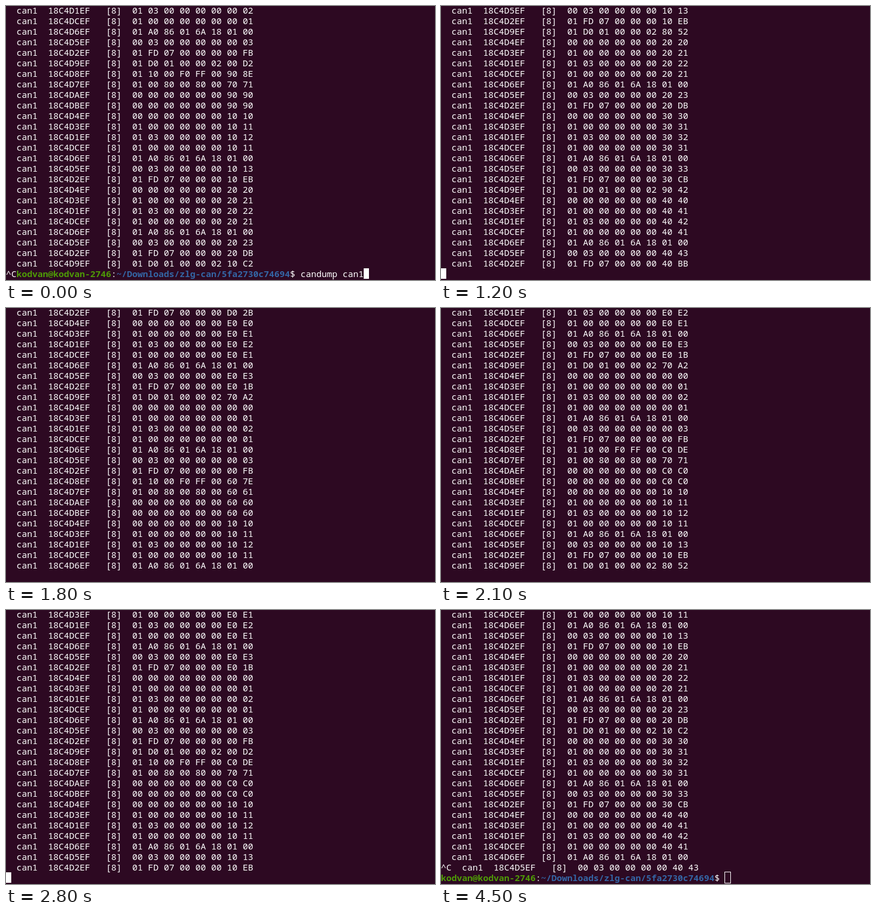
An HTML page with a canvas for the animation above (4.6 s loop, 734 px wide and 468 px high).

```html
<!DOCTYPE html>
<html lang="en">
<head>
<meta charset="utf-8">
<title>candump</title>
<style>
  html, body { margin: 0; width: 100%; height: 100%; overflow: hidden; background: #2d0922; }
  canvas { display: block; }
</style>
</head>
<body>
<canvas id="term" width="734" height="468"></canvas>
<script>
const ctx = document.getElementById('term').getContext('2d');
const LOOP = 4600, CELL_W = 9, CELL_H = 18, TOP = -2, BASE = 15, ROWS = 25;
const BG = '#2d0922', WHITE = '#ffffff', GREEN = '#4e9a06', BLUE = '#3465a4';
const FONT = '15px "Noto Sans Mono", "DejaVu Sans Mono", monospace';
const USER = 'kodvan@kodvan-2746', DIR = '~/Downloads/zlg-can/5fa2730c74694';

const hex = n => n.toString(16).toUpperCase().padStart(2, '0');
const wrap = n => ((n % 15) + 15) % 15; // all counters run from 0 to E

function format(id, bytes) {
  return `  can1  18C4${id}EF   [8]  ${bytes.map(hex).join(' ')}`;
}

// Six data bytes, a rolling counter in the high nibble, then an XOR checksum.
function packet(id, head, count) {
  const bytes = [0, 1, 2, 3, 4, 5].map(i => head[i] || 0);
  bytes.push(wrap(count) << 4);
  bytes.push(bytes.reduce((a, b) => a ^ b));
  return format(id, bytes);
}

const groupLines = g => [
  packet('D4', [], g),
  packet('D3', [1], g),
  packet('D1', [1, 3], g),
  packet('DC', [1], g),
  format('D6', [1, 0xA0, 0x86, 1, 0x6A, 0x18, 1, 0]),
  packet('D5', [0, 3], g),
  packet('D2', [1, 0xFD, 7], g)
];

const speedLine = n => packet('D9', [1, 0xD0, 1, 0, 0, 2], n);

const wheelLines = n => [
  packet('D8', [1, 0x10, 0, 0xF0, 0xFF], n),
  packet('D7', [1, 0, 0x80, 0, 0x80], Math.min(wrap(n), 7)),
  packet('DA', [], n),
  packet('DB', [], n)
];

// Every second group ends with a speed line, every fifth with wheel lines.
const stream = [], start = {};
for (let g = -20; g <= 170; g++) {
  start[g] = stream.length;
  stream.push(...groupLines(g));
  if (g & 1) stream.push(speedLine((g + 15) / 2));
  if (g % 5 === 0) stream.push(...wheelLines(g / 5 - 6));
}

// Time and number of lines printed by then.
const progress = [
  [1100, start[4] + 7 - 65],
  [1200, start[4] + 7],
  [1600, start[41] + 3],
  [2100, start[91] + 8],
  [2800, start[166] + 7]
];

function printed(t) {
  const s = Math.min(2800, Math.floor(t / 100) * 100);
  let i = 0;
  while (i < progress.length - 2 && s > progress[i + 1][0]) i++;
  const [t0, n0] = progress[i], [t1, n1] = progress[i + 1];
  return Math.round(n0 + (n1 - n0) * (s - t0) / (t1 - t0));
}

const before = [
  ...groupLines(0).slice(2), speedLine(0), ...wheelLines(9),
  ...groupLines(1), ...groupLines(2), speedLine(1)
];
const lastLine = start[169] + 5;
const after = [...stream.slice(lastLine - 24, lastLine), '^C' + stream[lastLine]];

function write(text, col, row, color = WHITE, bold = false) {
  ctx.font = (bold ? 'bold ' : '') + FONT;
  ctx.fillStyle = color;
  const y = TOP + row * CELL_H + BASE;
  [...text].forEach((ch, i) => {
    if (ch !== ' ') ctx.fillText(ch, (col + i) * CELL_W, y);
  });
  return col + text.length;
}

function prompt(prefix, command) {
  let col = write(prefix, 0, ROWS);
  col = write(USER, col, ROWS, GREEN, true);
  col = write(':', col, ROWS);
  col = write(DIR, col, ROWS, BLUE, true);
  return write('$ ' + command, col, ROWS);
}

function cursor(col, hollow) {
  const x = col * CELL_W, y = TOP + ROWS * CELL_H;
  if (hollow) {
    ctx.strokeStyle = WHITE;
    ctx.lineWidth = 1;
    ctx.strokeRect(x - 0.5, y - 0.5, CELL_W + 1, CELL_H + 1);
  } else {
    ctx.fillStyle = WHITE;
    ctx.fillRect(x, y, CELL_W, CELL_H);
  }
}

const within = (t, a, b) => t >= a && t < b;

function draw(t) {
  ctx.fillStyle = BG;
  ctx.fillRect(0, 0, 734, 468);
  let lines = after, col = 0;
  if (t < 1100) {
    lines = before;
    col = prompt('^C', 'candump can1');
  } else if (t < 3000) {
    const end = printed(t);
    lines = stream.slice(end - ROWS, end);
  } else {
    col = prompt('', '');
  }
  lines.forEach((line, row) => write(line, 0, row));
  const off = within(t, 200, 800) || within(t, 1700, 2300) || within(t, 3500, 4100);
  if (!off) cursor(col, t >= 4500);
}

const origin = performance.now();
function tick() {
  draw((performance.now() - origin) % LOOP);
  requestAnimationFrame(tick);
}
tick();
</script>
</body>
</html>
```
